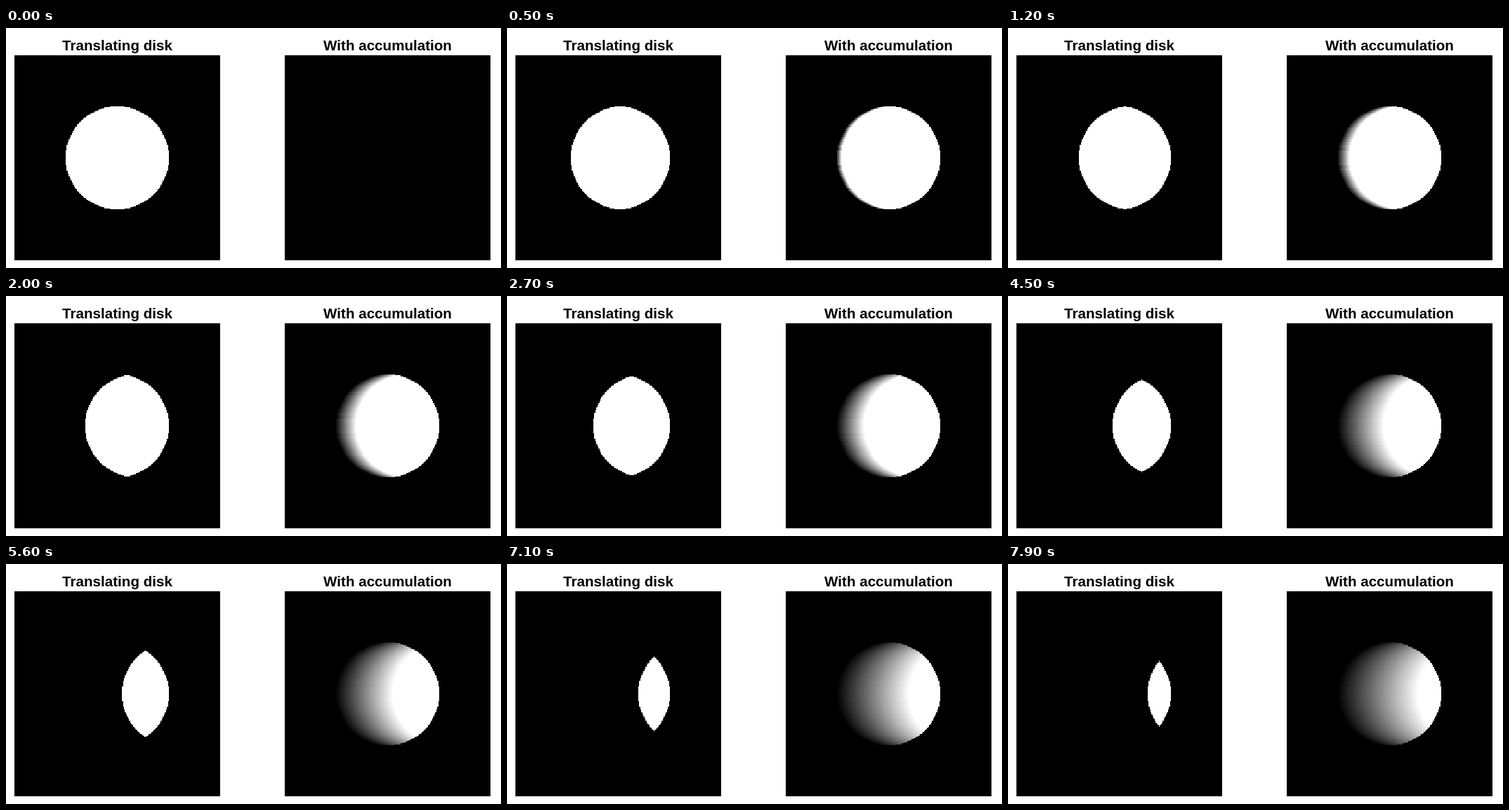
Write an HTML page with a canvas that moves like this. It is 705 by 343 pixels and loops after 8000 ms.

```html
<!DOCTYPE html>
<html lang="en">
<head>
<meta charset="utf-8">
<title>Translating disk</title>
<style>
  html, body { margin: 0; width: 100%; height: 100%; overflow: hidden; background: #fff; }
  canvas { display: block; }
</style>
</head>
<body>
<canvas id="stage" width="705" height="343"></canvas>
<script>
const STEP_MS = 100, STEPS = 80;
const HALF = 100, GRID = 2 * HALF + 1, RADIUS = 50.5;
const SIDE = 293, TOP = 39;

const ctx = document.getElementById('stage').getContext('2d');
const grid = document.createElement('canvas');
grid.width = grid.height = GRID;
const gridCtx = grid.getContext('2d');

// Fills the disk's grid cells with shade(distance from the row's left edge).
function drawPanel(left, shade) {
  const image = gridCtx.createImageData(GRID, GRID);
  const data = image.data;
  for (let i = 3; i < data.length; i += 4) data[i] = 255;
  for (let y = -HALF; y <= HALF; y++) {
    if (Math.abs(y) > RADIUS) continue;
    const w = Math.floor(Math.sqrt(RADIUS * RADIUS - y * y));
    for (let x = -w; x <= w; x++) {
      const i = 4 * ((y + HALF) * GRID + x + HALF);
      data.fill(Math.round(255 * shade(x + w)), i, i + 3);
    }
  }
  gridCtx.putImageData(image, 0, 0);
  ctx.drawImage(grid, left, TOP, SIDE, SIDE);
}

function drawTitle(text, left) {
  ctx.fillText(text, left + SIDE / 2, 32);
}

function draw(step) {
  const shift = Math.max(0, step - 1);
  ctx.fillStyle = '#fff';
  ctx.fillRect(0, 0, 705, 343);
  ctx.fillStyle = '#000';
  ctx.font = 'bold 20.6px "Liberation Sans", Arial, sans-serif';
  ctx.textAlign = 'center';
  ctx.imageSmoothingEnabled = false;
  drawTitle('Translating disk', 12);
  drawTitle('With accumulation', 397);
  // Left: overlap with the shifted disk. Right: mean of all overlaps so far.
  drawPanel(12, d => d >= shift ? 1 : 0);
  drawPanel(397, d => step ? Math.min(step, d + 1) / step : 0);
}

const start = performance.now();
let shown = -1;
function tick() {
  const step = Math.floor((performance.now() - start) / STEP_MS) % STEPS;
  if (step !== shown) draw(shown = step);
  requestAnimationFrame(tick);
}
tick();
</script>
</body>
</html>
```
